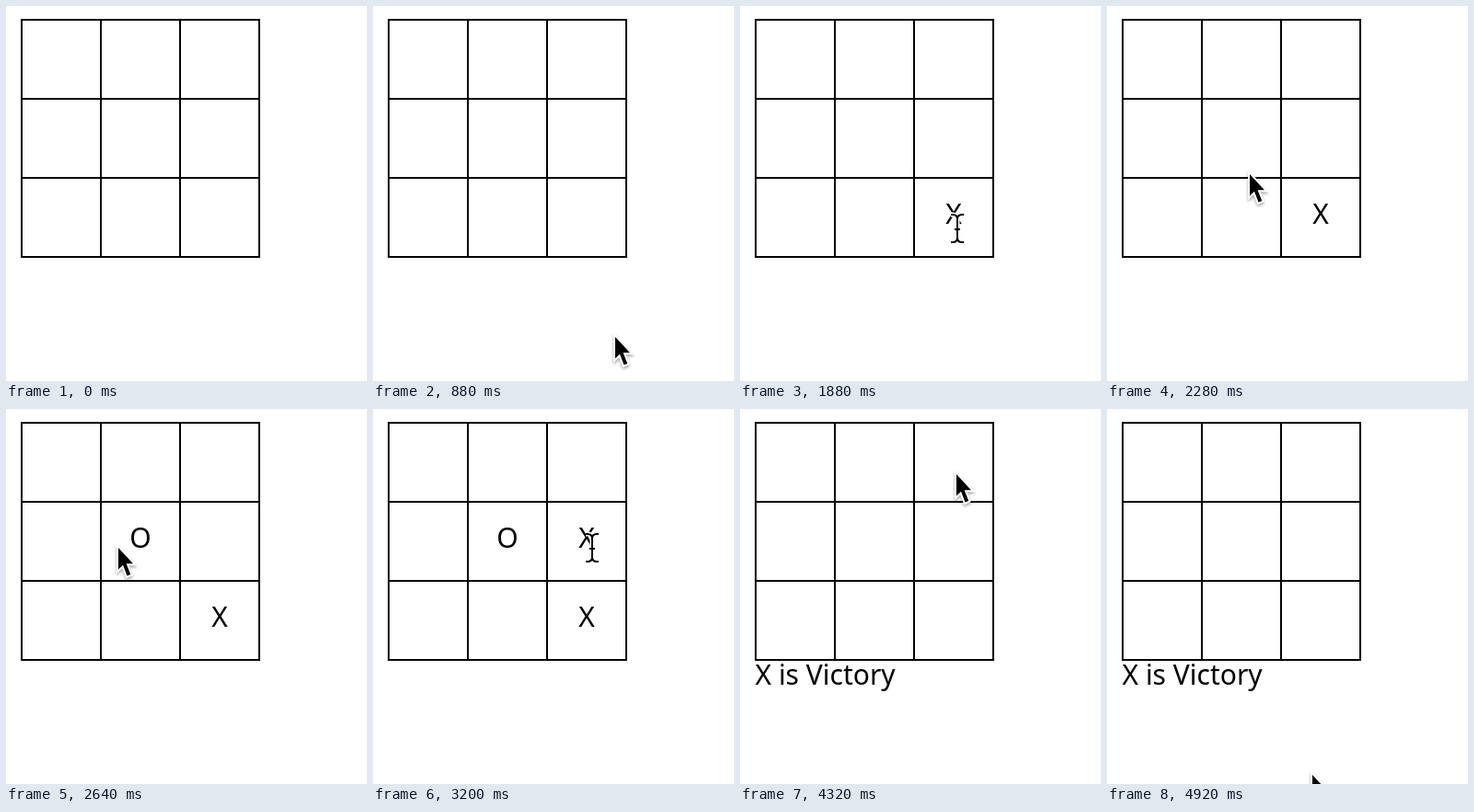
An HTML page that plays this animation: 392 px wide and 408 px high, repeating every 5920 ms.

```html
<!DOCTYPE html>
<html lang="en">
<head>
<meta charset="utf-8">
<title>Tic-tac-toe</title>
<style>
  html, body { margin: 0; width: 100%; height: 100%; overflow: hidden; background: #fff; }
  svg { display: block; width: 392px; height: 408px; }
  text { font: 30px "Noto Sans", "Open Sans", sans-serif; }
  .mark { text-anchor: middle; }
  #arrow { filter: drop-shadow(0 2px 1.5px rgba(0, 0, 0, .35)); }
  #beam path { fill: none; }
</style>
</head>
<body>
<svg viewBox="0 0 392 408">
  <path id="grid" fill="none" stroke="#000" stroke-width="2"/>
  <g id="marks"></g>
  <text id="message" x="16.5" y="300">X is Victory</text>
  <g id="arrow">
    <path d="M0 0V23.5L5 18.7L9.5 30.6L13.3 29L8.6 17.3H16Z"
      stroke="#fff" stroke-width="4" paint-order="stroke"/>
  </g>
  <g id="beam">
    <path class="ibeam" stroke="#fff" stroke-width="5"/>
    <path class="ibeam" stroke="#000" stroke-width="2"/>
  </g>
</svg>
<script>
const LOOP = 5920, STEP = 40, CELL = 86, LEFT = 17, TOP = 15;
const APPEAR = 880, WIN = 4320;
const $ = id => document.getElementById(id);

// Moves: time, mark, column, row
const moves = [
  [1880, "X", 2, 2],
  [2640, "O", 1, 1],
  [3200, "X", 2, 1],
  [3840, "O", 1, 0]
];

// While the pointer rests on a fresh X it turns into a text beam
const beams = [[1880, 2120], [3200, 3400]];

const linear = p => p;
const out = p => Math.sin(p * Math.PI / 2);
const inOut = p => (1 - Math.cos(p * Math.PI)) / 2;
const hold = () => 0;

// Pointer path: time, x, y, easing towards the next point
const path = [
  [880, 263, 360, out],
  [1240, 243, 259, hold],
  [1600, 243, 259, out],
  [1720, 235, 243, hold],
  [1880, 236, 242, hold],
  [2120, 221, 236, out],
  [2480, 119, 154, hold],
  [2640, 122, 151, inOut],
  [2960, 237, 152, hold],
  [3200, 238, 151, hold],
  [3400, 223, 147, out],
  [3680, 141, 94, hold],
  [3840, 143, 90, hold],
  [3880, 143, 90, inOut],
  [4200, 235, 71, hold],
  [4320, 235, 71, linear],
  [4360, 235, 96, linear],
  [4400, 234, 132, linear],
  [4760, 222, 412, hold],
  [4920, 223, 398, hold]
];

let lines = "";
for (let i = 0; i < 4; i++) {
  const d = i * CELL;
  lines += `M${LEFT + d} ${TOP - 1}v260M${LEFT - 1} ${TOP + d}h260`;
}
$("grid").setAttribute("d", lines);

for (const b of document.querySelectorAll(".ibeam"))
  b.setAttribute("d", "M-7-15h2q5 0 5 5q0-5 5-5h2M0-10V10M-7 15h2q5 0 5-5q0 5 5 5h2M-3 1h6");

const marks = moves.map(([, letter, col, row]) => {
  const el = document.createElementNS("http://www.w3.org/2000/svg", "text");
  el.textContent = letter;
  el.setAttribute("class", "mark");
  el.setAttribute("x", LEFT + (col + .5) * CELL);
  el.setAttribute("y", 65 + row * CELL);
  $("marks").append(el);
  return el;
});

const show = (el, on) => el.setAttribute("visibility", on ? "visible" : "hidden");

function pointer(t) {
  let i = path.length - 1;
  while (i > 0 && path[i][0] > t) i--;
  const [t0, x0, y0, ease] = path[i];
  const [t1, x1, y1] = path[i + 1] || [LOOP, x0, y0];
  const p = ease((t - t0) / (t1 - t0));
  return [x0 + (x1 - x0) * p, y0 + (y1 - y0) * p];
}

function draw(ms) {
  const t = Math.floor(ms % LOOP / STEP) * STEP;
  marks.forEach((el, i) => show(el, t >= moves[i][0] && t < WIN));
  show($("message"), t >= WIN);

  const beam = beams.some(([a, b]) => t >= a && t < b);
  show($("beam"), beam);
  show($("arrow"), t >= APPEAR && !beam);
  const [x, y] = pointer(Math.max(t, APPEAR)).map(Math.round);
  for (const id of ["arrow", "beam"])
    $(id).setAttribute("transform", `translate(${x} ${y})`);
}

const start = performance.now();
function tick() {
  draw(performance.now() - start);
  requestAnimationFrame(tick);
}
tick();
</script>
</body>
</html>
```
